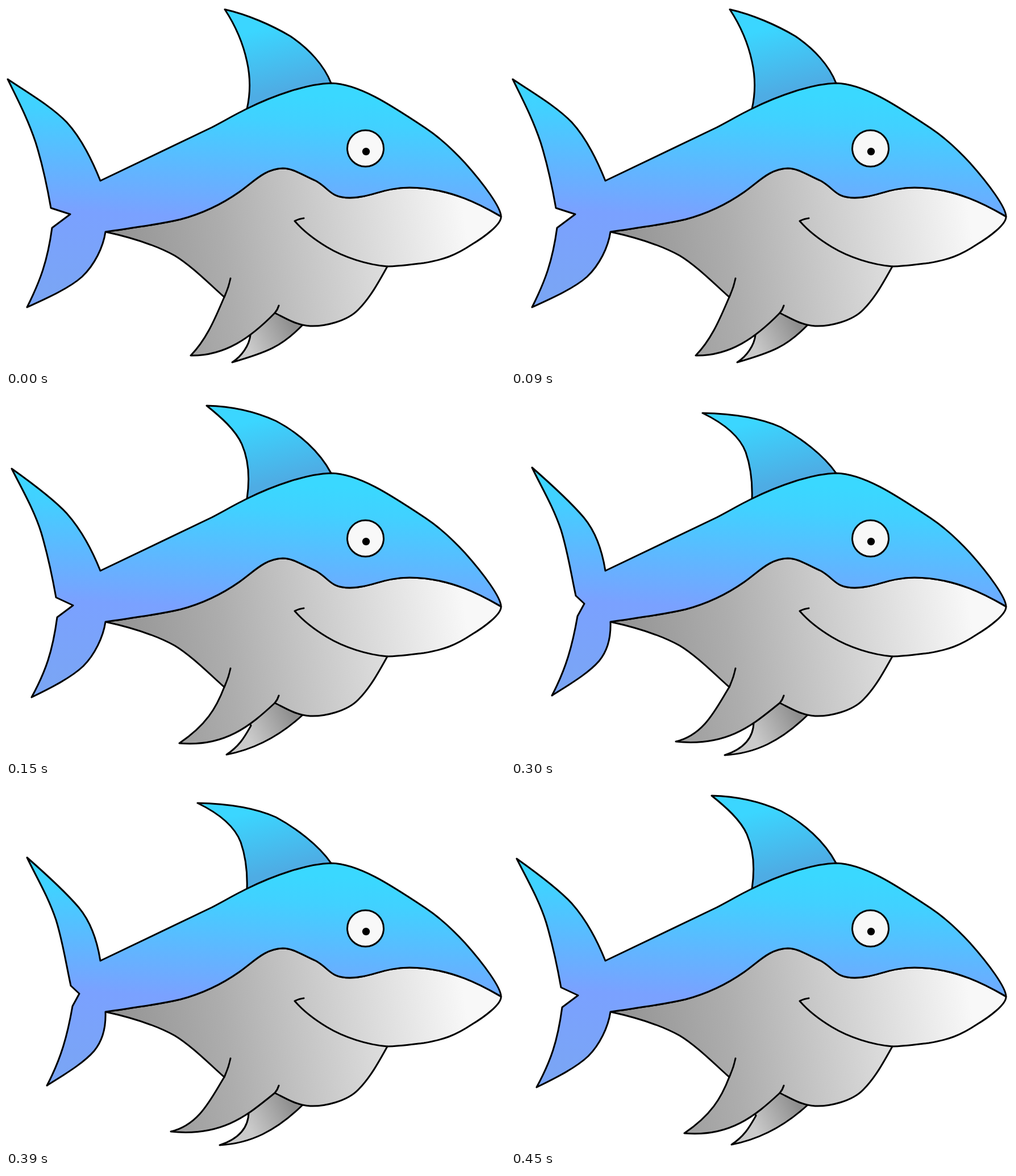
An HTML page for the animation above (600 ms loop, 878 by 638 pixels).

```html
<!DOCTYPE html>
<html lang="en">
<head>
<meta charset="utf-8">
<title>Swimming shark</title>
<style>
  html, body { margin: 0; width: 100%; height: 100%; overflow: hidden; background: #fff; }
  svg { display: block; width: 878px; height: 638px; }
  .ink { stroke: #000; stroke-width: 3; stroke-linejoin: round; stroke-linecap: round; }
</style>
</head>
<body>
<svg viewBox="0 0 878 638">
  <defs>
    <linearGradient id="skin" gradientUnits="userSpaceOnUse" x1="400" y1="150" x2="380" y2="520">
      <stop offset="0" stop-color="#3ad8ff"/>
      <stop offset=".13" stop-color="#41d1ff"/>
      <stop offset=".4" stop-color="#61b5ff"/>
      <stop offset=".61" stop-color="#7aa1ff"/>
      <stop offset="1" stop-color="#7aa5f5"/>
    </linearGradient>
    <linearGradient id="back" gradientUnits="userSpaceOnUse" x1="462" y1="38" x2="488" y2="148">
      <stop offset="0" stop-color="#3bd6ff"/>
      <stop offset="1" stop-color="#4eace4"/>
    </linearGradient>
    <linearGradient id="under" gradientUnits="userSpaceOnUse" x1="180" y1="440" x2="850" y2="340">
      <stop offset="0" stop-color="#929292"/>
      <stop offset=".3" stop-color="#adadad"/>
      <stop offset=".55" stop-color="#cbcbcb"/>
      <stop offset=".93" stop-color="#f8f8f8"/>
    </linearGradient>
    <linearGradient id="far" gradientUnits="userSpaceOnUse" x1="505" y1="562" x2="428" y2="602">
      <stop offset="0" stop-color="#8e8e8e"/>
      <stop offset="1" stop-color="#cacaca"/>
    </linearGradient>
  </defs>
  <g class="ink" fill="none">
    <path id="dorsal" fill="url(#back)"/>
    <path id="farFin" fill="url(#far)"/>
    <path id="belly" fill="url(#under)"/>
    <path id="body" fill="url(#skin)"/>
    <path d="M671 459C635 456 595 443 565 425C540 410 520 393 508 379Q515 375 524 374"/>
    <path d="M384 513C391 498 393 490 395 480M473 541Q478 535 480 528"/>
    <circle cx="632.5" cy="251" r="32" fill="#f8f8f8"/>
  </g>
  <circle cx="633.5" cy="256.5" r="6.7"/>
</svg>
<script>
const STEP = 150;
const ORDER = [0, 1, 2, 1];

// Still outlines
const RIDGE = 'L362 214C385 202 405 190 424 181C470 158 530 137 572 136C620 137 675 173 738 215C765 233 785 252 808 277C840 313 871 355 871 371';
const SEAM = 'C845 356 785 320 710 320C665 320 640 338 605 338C570 338 570 322 545 308C520 297 505 286 487 286C455 287 437 309 410 328C380 349 345 366 307 376C265 386 220 391 175 398';
const CHIN = 'C230 410 270 425 297 440C325 457 355 487 384 513';
const JAW = 'C493 551 510 562 535 564C560 565 600 556 620 535C640 515 655 488 671 459C690 459 710 456 735 453C770 447 790 440 820 420C840 408 872 385 871 371Z';

// Moving edges: fins forward, midway, swept back
const DORSAL = [
  'C431 150 430 125 424 98C417 65 402 32 385 6C425 15 468 34 500 53C533 75 560 105 572 136',
  'C429 147 428 115 415 85C404 60 378 37 353 17C395 18 438 27 475 44C515 65 552 98 572 136',
  'C425 150 422 125 413 99C402 70 372 47 337 30C385 31 435 37 475 55C510 74 550 104 572 136'
];
const LOWER_TAIL = [
  'C171 425 156 456 134 477C112 497 72 515 37 531C60 485 73 450 81 391L113 367',
  'C171 425 156 456 136 476C115 496 80 514 45 531C70 485 82 450 90 390L118 369',
  'C176 425 170 449 155 467C135 490 100 510 72 528C97 480 108 440 117 388L129 366'
];
const UPPER_TAIL = [
  'L79 356C71 310 63 275 52 240C38 198 20 164 3 129C40 154 80 177 107 205C130 230 150 268 166 308',
  'L88 355C80 310 72 275 62 241C50 202 28 164 10 128C45 153 85 183 107 207C130 233 150 268 166 308',
  'L114 352C105 310 100 275 88 236C73 192 53 160 37 126C70 155 105 187 128 214C148 238 160 270 166 308'
];
const NEAR_FIN = [
  'C370 545 355 585 325 616C385 617 430 585 473 541',
  'C370 550 352 580 305 612C385 619 430 581 473 541',
  'C360 552 340 597 290 609C385 619 430 575 473 541'
];
const FAR_FIN = [
  'C485 600 460 610 398 628C415 617 428 598 430 580',
  'C475 605 430 624 388 632C412 616 420 600 431 581L429 577',
  'C475 608 430 630 376 633C412 621 427 600 427 574'
];

const setPath = (id, d) => document.getElementById(id).setAttribute('d', d);

function draw(k) {
  setPath('dorsal', 'M424 181' + DORSAL[k]);
  setPath('body', 'M175 398' + LOWER_TAIL[k] + UPPER_TAIL[k] + RIDGE + SEAM + 'Z');
  setPath('belly', 'M871 371' + SEAM + CHIN + NEAR_FIN[k] + JAW);
  setPath('farFin', 'M521 563' + FAR_FIN[k] + 'L430 550L480 535');
}

let shown = 0;
function tick(now) {
  const k = ORDER[Math.floor(now / STEP) % ORDER.length];
  if (k !== shown) draw(shown = k);
  requestAnimationFrame(tick);
}
draw(shown);
requestAnimationFrame(tick);
</script>
</body>
</html>
```
